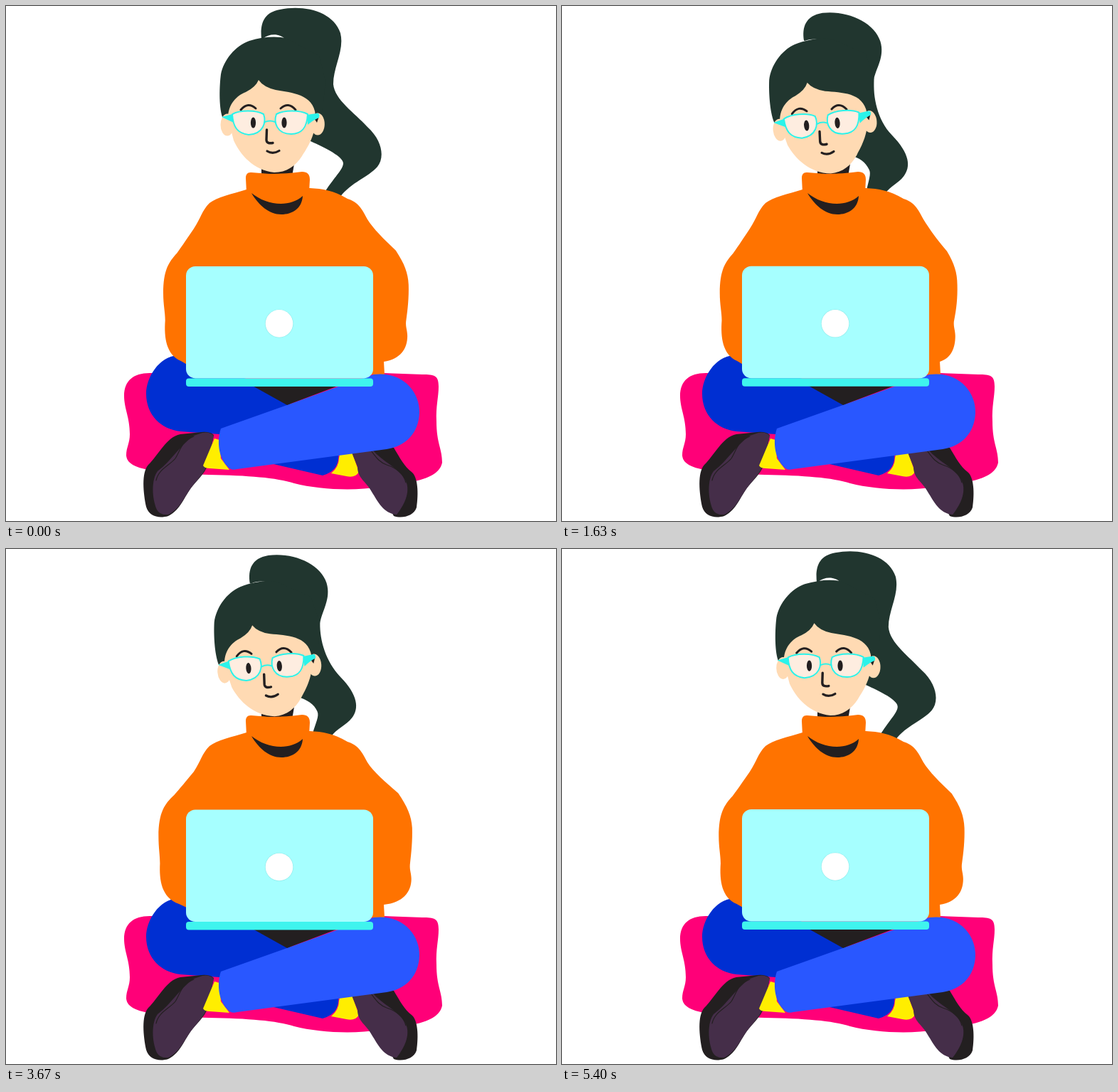
Write an HTML page with a canvas that moves like this. It is 773 px wide and 724 px high and loops after 5460 ms.

```html
<!DOCTYPE html>
<html lang="en">
<head>
<meta charset="utf-8">
<title>Working on a laptop</title>
<style>
html, body { margin: 0; width: 100%; height: 100%; overflow: hidden; background: #fff; }
canvas { display: block; }
</style>
</head>
<body>
<canvas id="stage" width="773" height="724"></canvas>
<script>
const ctx = document.getElementById('stage').getContext('2d');
const SWAY = 2730;
const BREATH = SWAY / 2;
const TAU = Math.PI * 2;

const INK = '#231f20', HAIR = '#21362f', SKIN = '#ffdab3', KNIT = '#ff7300',
  CYAN = '#2bf3ea', LENS = '#feede0', NAVY = '#002fd2', BLUE = '#2957ff',
  PINK = '#ff0078', SOCK = '#ffee00', SHOE = '#452e49';

function fill(d, color) {
  ctx.fillStyle = color;
  ctx.fill(new Path2D(d));
}

function line(d, color, width) {
  ctx.strokeStyle = color;
  ctx.lineWidth = width;
  ctx.lineCap = ctx.lineJoin = 'round';
  ctx.stroke(new Path2D(d));
}

function oval(x, y, rx, ry, color) {
  ctx.fillStyle = color;
  ctx.beginPath();
  ctx.ellipse(x, y, rx, ry, 0, 0, TAU);
  ctx.fill();
}

function box(x, y, w, h, r, color) {
  ctx.fillStyle = color;
  ctx.beginPath();
  ctx.roundRect(x, y, w, h, r);
  ctx.fill();
}

const mix = (a, b, k) => a + (b - a) * k;

// Linear interpolation through [time, value] keys
function track(keys, t) {
  let i = 1;
  while (i < keys.length - 1 && t > keys[i][0]) i++;
  const [t0, v0] = keys[i - 1], [t1, v1] = keys[i];
  return mix(v0, v1, (t - t0) / (t1 - t0));
}

const breathKeys = [[0, .2], [190, 0], [700, 1], [1105, .4], [BREATH, .2]];

// Ponytail outline at both ends of the swing: a start point, then cubic segments
const tailOut = [359,46, 357,25, 362,9, 385,5, 420,-2, 460,8, 470,38,
  476,62, 460,85, 460,110, 462,132, 490,150, 508,170, 530,190, 532,214, 522,226,
  510,240, 485,248, 470,268, 464,268, 457,266, 448,262, 460,242, 474,230, 474,221,
  474,212, 450,200, 428,190, 420,150, 405,70, 393,47, 385,38, 370,38, 361,46];
const tailIn = [339,49, 336,30, 341,14, 365,10, 400,6, 438,24, 446,50,
  453,72, 440,88, 437,103, 436,128, 440,160, 461,182, 487,209, 488,227, 478,240,
  471,250, 460,253, 453,264, 445,264, 435,264, 427,259, 429,246, 433,236, 429,230,
  424,220, 416,214, 405,212, 395,150, 385,75, 368,50, 362,46, 350,46, 341,49];

function drawTail(sway) {
  const k = sway / .85;
  const p = tailOut.map((v, i) => mix(v, tailIn[i], k));
  ctx.fillStyle = HAIR;
  ctx.beginPath();
  ctx.moveTo(p[0], p[1]);
  for (let i = 2; i < p.length; i += 6) ctx.bezierCurveTo(...p.slice(i, i + 6));
  ctx.closePath();
  ctx.fill();
}

function drawCushion() {
  fill('M205 516 C180 515 166 526 166 548 C166 566 174 578 174 602 C174 615 169 620 169 632' +
    ' C171 652 205 655 285 659 C340 660 380 663 405 671 C440 680 490 682 525 676' +
    ' C555 670 607 670 613 642 C613 622 605 615 605 584 C604 562 608 550 608 535' +
    ' C608 519 602 518 585 518 L420 512 Z', PINK);
}

function drawLeftLeg() {
  fill('M241 491 C215 493 197 522 197 545 C197 575 218 595 245 598 L300 602 L350 638' +
    ' L445 660 Q470 653 467 628 L395 555 L340 525 L262 495 Z', NAVY);
}

function drawFeet() {
  fill('M470 626 L486 626 L496 655 Q491 664 478 661 L457 657 Q468 648 468 635 Z', SOCK);

  fill('M245 602 C225 606 214 632 200 645 C190 656 193 685 197 704 C201 717 214 721 228 717' +
    ' C246 708 250 690 262 675 C275 660 286 650 286 632 L292 603 Q286 598 275 599 Z', INK);
  fill('M264 604 C242 620 234 638 213 654 C204 666 205 692 212 708 Q216 716 228 715' +
    ' C246 706 250 690 262 675 C275 659 284 650 286 632 L292 604 Q286 598 276 600 Z', SHOE);
  line('M264 605 C246 612 245 625 238 636 C230 646 214 651 211 667', INK, 1.2);
  fill('M293 608 L277 646 Q279 650 286 650 L314 652 L302 636 L300 610 Z', SOCK);

  fill('M510 622 L545 621 C553 634 560 648 570 655 C579 662 580 685 577 705' +
    ' C573 717 557 721 545 717 L530 690 Z', INK);
  fill('M486 628 L515 624 C530 641 548 647 560 664 C570 680 561 700 549 715' +
    ' C530 713 523 697 514 683 C506 668 494 664 494 648 Z', SHOE);
  line('M513 625 C520 634 524 641 535 645 C550 650 559 658 562 670', INK, 1.2);
}

function drawRightLeg() {
  fill('M517 518 C558 513 582 543 581 572 C580 600 562 619 535 623 L325 651 Q316 654 310 646' +
    ' C299 634 296 612 302 594 L395 561 L470 534 Z', BLUE);
}

// l and r move the left and right elbows sideways
function drawSweater(l, r) {
  fill(`M338 258 C318 264 296 269 286 277 C275 288 274 298 264 313
    C${256 + l * .3} 326 ${250 + l * .5} 336 ${242 + l * .6} ${348 + l * .2}
    C${231 + l * .8} ${361 + l * .3} ${224 + l} ${372 + l * .2} ${224 + l} 404
    C${224 + l} 420 ${227 + l * 1.1} 430 ${227 + l * 1.1} 442
    C${225 + l} 466 ${228 + l} 490 ${247 + l * .4} 499 L256 505
    L262 520 L532 518 L531 500
    C${545 + r * .7} ${495 + r * .12} ${551 + r} 482 ${551 + r} 464
    C${551 + r} 456 ${548.5 + r} 452 ${549 + r} 444
    C${553 + r * .9} 425 ${554.5 + r * .9} 410 ${554 + r * .9} 392
    C${554 + r * .85} 375 ${550 + r * .75} 362 ${540 + r * .6} ${345 - r * .1}
    C${526 + r * .4} 328 516 313 508 300
    C498 280 492 275 480 271 C460 259 445 257 427 256 Z`, KNIT);
  fill('M338 262 L337 242 Q337 233 345 234 L370 236 Q396 236 416 233 Q427 233 427 244' +
    ' L426 262 Z', KNIT);
  fill('M345 263 C366 280 398 284 417 267 C416 285 402 293 387 293 C370 293 355 280 345 263 Z', INK);
}

function drawLaptop(dy) {
  fill('M343 532 L472 532 L395 561 Z', INK);
  ctx.save();
  ctx.translate(0, dy);
  box(253, 523.5, 263, 11.5, 4, '#3ff4ee');
  box(253, 366, 263, 157.5, 13, '#a6ffff');
  oval(384, 446.5, 20, 20, '#93eeee');
  oval(384, 446.5, 19.3, 19.3, '#fff');
  ctx.restore();
}

function drawFace(gaze) {
  fill('M304 156 C299 140 300 112 302 96 C306 76 322 56 342 49 C362 43 382 42 395 46' +
    ' L440 70 L449 105 C447 125 446 140 443 155 L430 170 L315 165 Z', HAIR);
  oval(311, 167, 9.5, 15.5, SKIN);
  oval(438, 166, 9.8, 15.5, SKIN);
  fill('M312 158 C312 138 324 126 337 121 Q351 114 355 104 Q362 114 379 118' +
    ' C402 122 432 124 435 153 C437 180 423 200 416 211 C407 225 394 234 377 234' +
    ' C348 231 329 209 320 189 Z', SKIN);
  fill('M435 150 L440 155 L437 164 L433 158 Z', INK);

  line('M330 146 Q340 134 351 144', INK, 3);
  line('M386 144 Q397 134 407 146', INK, 3);

  fill('M303 156 L318 152 L320 164 Z', CYAN);
  fill('M423 153 L436 151 Q442 150 440 157 Q434 159 424 167 Z', CYAN);
  const lenses = 'M318 152 C329 146 351 146 362 152 C366 163 362 180 341 181 C325 179 319 170 318 152 Z' +
    ' M380 152 C391 146 413 146 424 152 C423 171 416 180 401 180 C380 180 376 163 380 152 Z';
  fill(lenses, LENS);
  oval(347.5 + gaze, 164, 3.6, 7.6, INK);
  oval(391 + gaze, 164, 3.6, 7.6, INK);
  line(lenses, CYAN, 2);
  line('M364 163 Q371 160 378 163', CYAN, 2);

  line('M366.5 174 L366 188 Q366 194 375 192.5', INK, 3.4);
  line('M367 204 Q375 209 384 203.5', INK, 3.2);
}

function drawHead(sway, gaze) {
  ctx.save();
  ctx.translate(394, 228);
  ctx.rotate(-.105 * sway);
  ctx.translate(-394, -228);
  drawFace(gaze);
  ctx.restore();
}

function draw(time) {
  const t = time % SWAY;
  const sway = 1 - Math.abs(1 - t / BREATH);
  const breath = track(breathKeys, t % BREATH);
  const gaze = -2.5 * Math.sin(TAU * t / SWAY);
  const lean = 6.5 + 7.5 * Math.cos(TAU * (t - 450) / SWAY);

  ctx.fillStyle = '#fff';
  ctx.fillRect(0, 0, 773, 724);
  drawTail(sway);
  drawCushion();
  drawLeftLeg();
  drawFeet();
  fill('M359 226 L405 222 L402 240 L359 240 Z', INK);
  drawHead(sway, gaze);
  drawSweater(-15 * breath, lean + 14 * breath);
  drawRightLeg();
  drawLaptop(breath * 1.4 - .4);
}

const start = performance.now();
function tick() {
  draw(performance.now() - start);
  requestAnimationFrame(tick);
}
tick();
</script>
</body>
</html>
```
